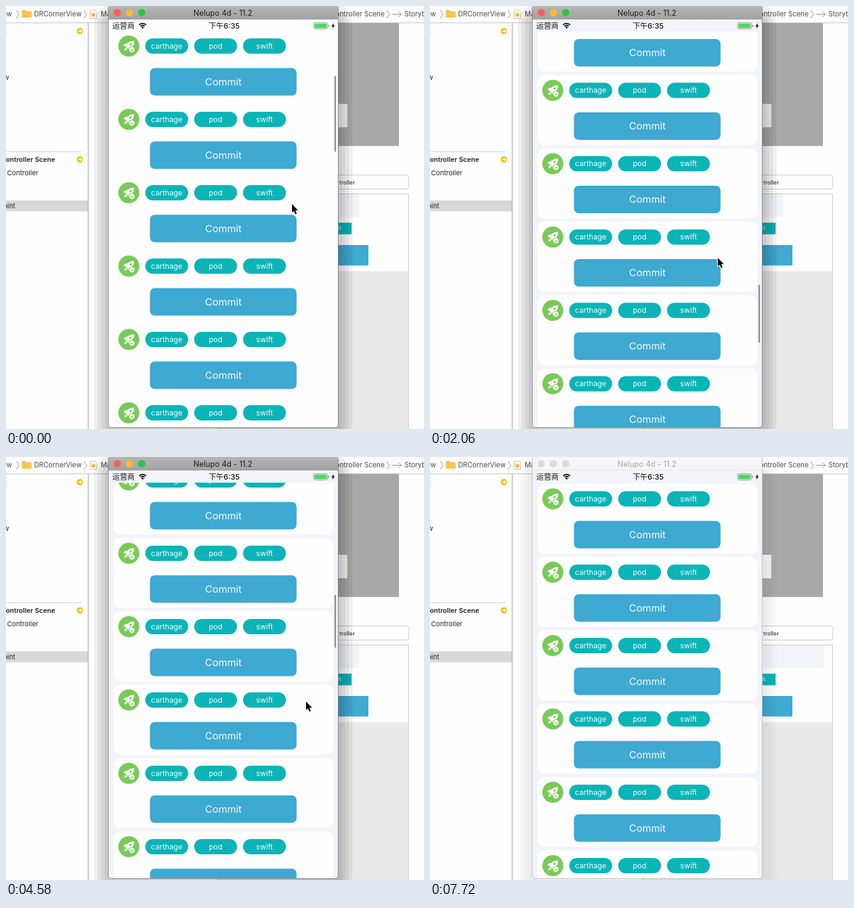
Animation of 684 by 692 pixels, one loop 7820 ms. Source, as an HTML page with a canvas:

```html
<!DOCTYPE html>
<html lang="en">
<head>
<meta charset="utf-8">
<title>Card list scrolling</title>
<style>
html, body { margin: 0; width: 100%; height: 100%; overflow: hidden; background: #fefefe; }
canvas { display: block; width: 684px; height: 692px; }
</style>
</head>
<body>
<canvas id="stage"></canvas>
<script>
const W = 684, H = 692, LOOP = 7820, INACTIVE_AT = 7720;
const STEP = 147.7, ROW = 120, TOP = 43.5;
const WHITE = '#fefefe', LAVENDER = '#f3f4fb', TEAL = '#0bb4b7', BLUE = '#3ea9d1', GREEN = '#79ca59';
const INK = '#4a4a4a', BLACK = '#111', RULE = '#c6c6c6';
const SANS = 'Inter, "Noto Sans CJK SC", "Noto Sans CJK", sans-serif';

const canvas = document.getElementById('stage');
const c = canvas.getContext('2d');
const dpr = window.devicePixelRatio || 1;
canvas.width = W * dpr;
canvas.height = H * dpr;

const clamp = (v, lo, hi) => Math.min(hi, Math.max(lo, v));

function rect(x, y, w, h, fill) {
  c.fillStyle = fill;
  c.fillRect(x, y, w, h);
}
function round(x, y, w, h, r, fill, stroke) {
  c.beginPath();
  c.roundRect(x, y, w, h, r);
  if (fill) { c.fillStyle = fill; c.fill(); }
  if (stroke) { c.strokeStyle = stroke; c.lineWidth = 1; c.stroke(); }
}
function disc(x, y, r, fill) {
  c.beginPath();
  c.arc(x, y, r, 0, Math.PI * 2);
  c.fillStyle = fill;
  c.fill();
}
function fan(x, y, r, spread) {
  c.beginPath();
  c.arc(x, y, r, -Math.PI / 2 - spread, -Math.PI / 2 + spread);
}
function stroke(path, color, width) {
  c.strokeStyle = color;
  c.lineWidth = width;
  c.stroke(new Path2D(path));
}
function fill(path, color) {
  c.fillStyle = color;
  c.fill(new Path2D(path));
}
function text(s, x, y, size, color, align = 'left', weight = 400) {
  c.font = `${weight} ${size}px ${SANS}`;
  c.textAlign = align;
  c.fillStyle = color;
  c.fillText(s, x, y);
}

// A glide slows down exponentially towards its end; rest is the distance left at step k0.
const glide = (end, rest, k0, k) => end - rest * Math.exp(-0.295 * (k - k0));

// Two flicks down the list, one back up, then a damped bounce at the top.
function scrollAt(k) {
  if (k >= 48) return 0;
  if (k >= 42) {
    const m = k - 41;
    return 857 * Math.exp(-0.9 * m) * Math.cos(0.65 * m);
  }
  const down = Math.max(glide(1127.4, 764.4, 0, Math.min(k, 7)), glide(3429, 618.5, 14, Math.min(k, 22)));
  return Math.min(down, glide(830, -521, 31, k));
}

// Row heights below are estimated until reached, so the bar shrinks on the way down.
function barLength(k, s) {
  return k > 22 ? 86.5 : 124 - Math.max(0, s - 1030) * 0.0165;
}

// Pointer stops as [arrival step, x, y]; each move takes up to two steps.
const STOPS = [
  [0, 468, 324], [5, 438, 434], [10, 462, 15], [14, 471, 412], [27, 470, 664],
  [31, 491, 400], [38, 461, 382], [43, 456, 640], [47, 631, 230]
];
function pointerAt(k) {
  const i = Math.max(1, STOPS.findIndex(stop => stop[0] >= k));
  const [, x0, y0] = STOPS[i - 1], [end, x1, y1] = STOPS[i];
  const p = clamp(1 - (end - k) / 2, 0, 1);
  return [x0 + (x1 - x0) * p, y0 + (y1 - y0) * p];
}

function jumpMark(y) {
  disc(121, y, 5.2, '#f6bd16');
  stroke(`M118 ${y}h6m-2.4 -2.6l2.6 2.6l-2.6 2.6`, '#fff', 1.3);
}
function chevron(x) {
  stroke(`M${x} 7l4.5 6.5l-4.5 6.5`, '#8c8c8c', 1);
}

function toolbar() {
  const label = (s, x, align) => text(s, x, 17, 11.2, INK, align);
  label('ew', 10, 'right');
  label('DRCornerView', 46);
  label('Main', 155);
  label('ontroller Scene', 619.5, 'right');
  label('Storyboard', 652);
  [17, 127.5, 623].forEach(chevron);
  round(26, 7, 7, 5, 1.5, '#e9b63a');
  round(26, 8.5, 16, 10.5, 1.5, '#f6c64c');
  round(137.5, 6.5, 11, 14, [0, 4, 0, 0], '#fbf3dc', '#cfc8b4');
  disc(143, 14.5, 3, '#efb73b');
  stroke('M632 13.5h15m-5 -4.5l5 4.5l-5 4.5', '#8c8c8c', 1);
  rect(0, 27, W, 1, '#c2c2c2');
}

function outline() {
  const label = (s, right, y, weight) => text(s, right, y, 11, '#222', 'right', weight);
  rect(134, 28, 1, H, '#9b9b9b');
  rect(0, 238, 124, 1, '#cfcfcf');
  rect(0, 318, 134, 18, '#d8d8d8');
  label(':', 1.5, 45);
  label('w', 5, 121);
  label('ontroller Scene', 80.5, 255, 600);
  label('Controller', 53, 277);
  label('oint', 15, 331);
  jumpMark(41);
  jumpMark(251);
}

function storyboard(inactive) {
  rect(348, 28, 295, 201, '#a8a8a8');
  rect(440, 160, 118.5, 38.5, '#f7f7f7');
  round(347.5, 276.5, 311.5, 23, 3, WHITE, RULE);
  text('troller', 571, 291.5, 9, '#555', 'right', 600);
  rect(347, 307, 312, H, RULE);
  rect(348, 308, 310, H, '#e9e9e9');
  rect(348, 308, 310, 126, WHITE);
  rect(348, 308, inactive ? 296 : 230, 37, LAVENDER);
  rect(440, 354.5, 125.5, 19, TEAL);
  text('ft', 549, 367, 8.5, '#d9f3f3', 'right');
  rect(440, 391, 153, 33.5, BLUE);
}

function shadow(inactive) {
  const shade = `rgba(0,0,0,${inactive ? 0.018 : 0.06})`;
  for (let d = 24; d > 0; d -= 6) round(168 - d, 20 - d, 375 + d * 2, 720, 10 + d, shade);
}

function rocket(y) {
  disc(201, y, 17.2, GREEN);
  c.save();
  c.translate(201, y);
  c.rotate(Math.PI / 4);
  for (const side of [1, -1]) {
    c.scale(side, 1);
    fill('M0 -12C4 -9 6 -3 3.6 4.5H-0.2z', '#fff');
    fill('M4.4 -2Q8 1 7 6L3 3.5z', '#fff');
  }
  fill('M-2.4 5.8H2.4L0 11z', '#fff');
  disc(0, -4, 1.8, GREEN);
  c.restore();
  disc(206, y + 6, 5.6, GREEN);
  disc(206, y + 6, 4.4, '#fff');
  stroke(`M203.9 ${y + 6}l1.6 1.6l2.8 -3`, GREEN, 1.2);
}

function card(y) {
  round(176, y, 359.5, 114.5, 12, WHITE);
  rocket(y + 25);
  ['carthage', 'pod', 'swift'].forEach((label, i) => {
    const x = 228 + i * 80;
    round(x, y + 12.5, 70, 25, 12.2, TEAL);
    text(label, x + 35, y + 29.4, 12.2, '#f2fbfb', 'center');
  });
  round(235.5, y + 61, 240, 45, 8, BLUE);
  text('Commit', 355.7, y + 89.4, 16.4, '#f4fafd', 'center');
}

function titleBar(inactive) {
  const shade = c.createLinearGradient(0, 0, 0, 22);
  shade.addColorStop(0, inactive ? '#f7f7f7' : '#b4b4b4');
  shade.addColorStop(1, inactive ? '#f5f5f5' : '#a2a2a2');
  round(168, -1, 375, 23, [5, 5, 0, 0], shade);
  rect(168, 21.5, 375, 0.5, inactive ? '#d8d8d8' : '#8d8d8d');
  ['#fb5f57', '#fcbb2e', '#28c640'].forEach((color, i) => {
    disc(182 + i * 20, 11, 6, inactive ? '#dadada' : color);
  });
  text('Nelupo 4d - 11.2', 355, 16, 12.6, inactive ? '#a6a6a6' : '#1d1d1d', 'center');
}

function statusBar() {
  text('运营商', 174, 36.6, 12.2, BLACK);
  text('下午6:35', 357, 36.6, 12.2, BLACK, 'center', 500);
  c.strokeStyle = c.fillStyle = BLACK;
  c.lineWidth = 2;
  for (const r of [4.7, 8]) {
    fan(223.5, 36.5, r, 0.8);
    c.stroke();
  }
  fan(223.5, 36.5, 2.6, 0.9);
  c.lineTo(223.5, 37.3);
  c.fill();
  round(503.5, 27.5, 22.5, 10, 2.5, null, '#8b8b90');
  round(505, 29, 19.5, 7, 1.3, '#4cd663');
  round(527, 30.7, 1.4, 3.8, 0.7, '#8b8b90');
  fill('M536.6 27.5l-4.2 5.7h2.6l-1.2 4.4l4.4 -6.1h-2.6z', BLACK);
}

function scrollBar(k, s) {
  const view = 647, track = 643, len = barLength(k, s);
  const content = view * track / len;
  const y = 45 + (track - len) * Math.max(0, s) / (content - view);
  c.globalAlpha = clamp((48 - k) / 3, 0, 1);
  round(537.4, y, 2.6, len + Math.min(0, s), 1.3, '#929296');
}

function phone(k, inactive) {
  const s = scrollAt(k);
  c.save();
  c.beginPath();
  c.roundRect(168, 0, 375, 689, [0, 0, 4, 4]);
  c.clip();
  rect(168, 22, 375, 667, k === 0 ? WHITE : LAVENDER);
  c.save();
  c.beginPath();
  c.rect(168, 42, 375, 647);
  c.clip();
  const first = Math.max(0, Math.floor(s / ROW));
  for (let i = first; i < first + 7; i++) card(TOP - s + i * ROW);
  scrollBar(k, s);
  c.restore();
  statusBar();
  c.restore();
  titleBar(inactive);
  round(167.5, -2, 376, 691.5, 5, null, inactive ? '#c4c4c4' : '#8f8f8f');
}

function pointer(k) {
  if (k > 47) return;
  const arrow = 'M0 0V14L3.1 11.2L5.4 16.4L7.8 15.4L5.5 10.3H9.8z';
  c.save();
  c.translate(...pointerAt(k));
  c.lineJoin = 'round';
  stroke(arrow, '#fff', 2.2);
  fill(arrow, '#000');
  c.restore();
}

function draw(t) {
  const k = Math.floor((t + 9) / STEP);
  const inactive = t >= INACTIVE_AT;
  c.setTransform(dpr, 0, 0, dpr, 0, 0);
  rect(0, 0, W, H, WHITE);
  toolbar();
  outline();
  storyboard(inactive);
  shadow(inactive);
  phone(k, inactive);
  pointer(k);
}

const start = performance.now();
function tick() {
  draw((performance.now() - start) % LOOP);
  requestAnimationFrame(tick);
}
tick();
</script>
</body>
</html>
```
